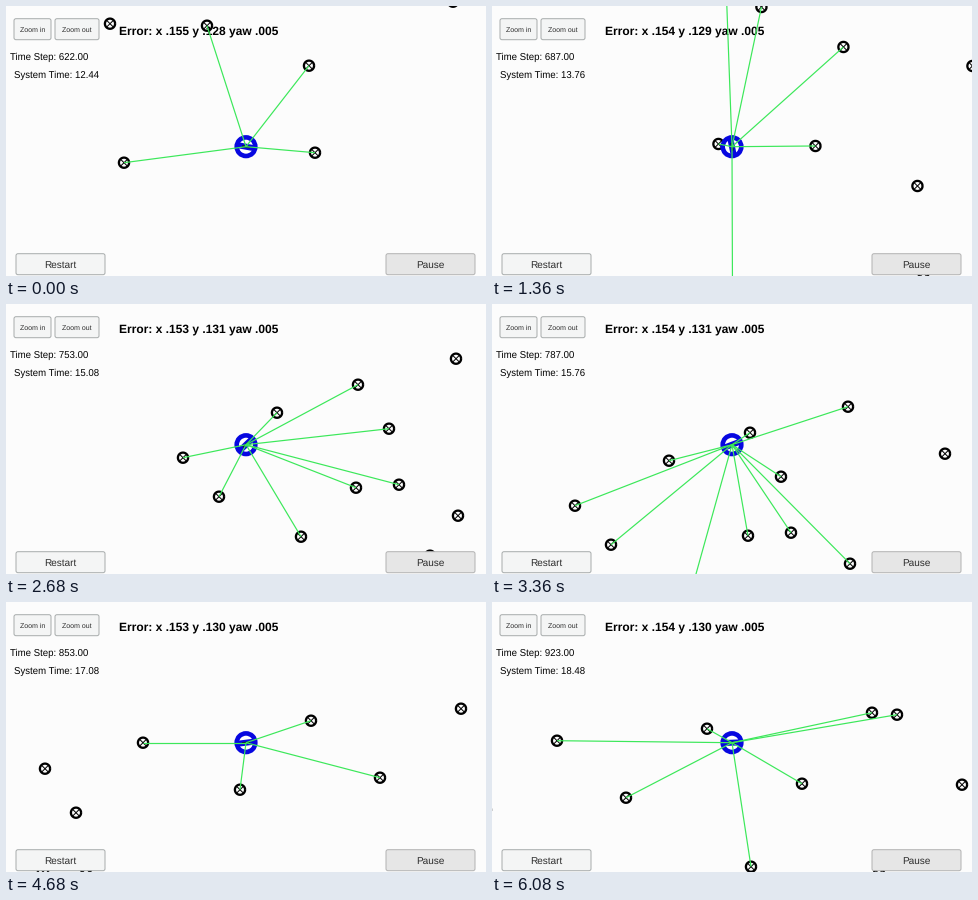
A matplotlib script for the animation above (6120 ms loop, 480 by 270 pixels).

```python
import numpy as np
import matplotlib.pyplot as plt
from matplotlib.animation import FuncAnimation
from matplotlib.collections import LineCollection
from matplotlib.patches import Circle, FancyBboxPatch

W, H, DPI = 480, 270, 100
PX = 72 / DPI                      # points per pixel
INTERVAL, FRAMES = 40, 153
SENSOR_RANGE = 179
ORIGIN = np.array([240, 141])
BLUE = "#0707e0"

plt.rcParams["font.family"] = "Liberation Sans"
plt.rcParams["text.hinting"] = "none"

# Key points of the drive: tick, view offset x, view offset y
DRIVE = np.array([(0, 0, 0), (16, 79, 35), (49, 120, 218), (66, 66, 312),
                  (83, -28, 360), (116, -247, 398), (151, -487, 418)], float)
TICKS, OFFSETS = DRIVE[:, 0], DRIVE[:, 1:]
SPEEDS = np.gradient(OFFSETS, TICKS, axis=0, edge_order=2)

# Map of the world, in view coordinates at the start of the drive
LANDMARKS = np.array([
    (104, 18), (201, 20), (303, 60), (309, 147), (118, 157), (447, -4),
    (396, -32), (205, -203), (317, -187), (111, -158), (284, -128),
    (327, -131), (147, -119), (229, -79), (358, -60), (384, -257),
    (286, -231), (386, -100), (481, -210), (702, -291), (552, -279),
    (621, -222), (867, -307), (892, -305), (797, -236), (957, -235),
    (746, -153), (874, -146)], float)

ANGLES = np.linspace(0, 2 * np.pi, 33)
RING = 5.1 * np.column_stack([np.cos(ANGLES), np.sin(ANGLES)])
CROSS = 3.4 * np.array([[(-1, -1), (1, 1)], [(-1, 1), (1, -1)]])


def camera(t):
    """Smooth path through the key points (cubic Hermite)."""
    i = min(np.searchsorted(TICKS, t, "right"), len(TICKS) - 1) - 1
    span = TICKS[i + 1] - TICKS[i]
    u = (t - TICKS[i]) / span
    ease = u * u * (3 - 2 * u)
    return (OFFSETS[i] + ease * (OFFSETS[i + 1] - OFFSETS[i])
            + span * u * (1 - u) * ((1 - u) * SPEEDS[i] - u * SPEEDS[i + 1]))


def pose_error(t):
    """Filter error in thousandths: an early bump that settles."""
    x = (153.5 + 2.2 * np.exp(-((t - 12) / 20) ** 2)
         + .3 * np.cos(2 * np.pi * (t - 83) / 64))
    y = 130 - 2 * np.cos(np.pi * t / 90) * np.exp(-(t / 90) ** 2)
    return round(x), round(y)


fig = plt.figure(figsize=(W / DPI, H / DPI), dpi=DPI, facecolor="#fcfcfc")
ax = fig.add_axes([0, 0, 1, 1])
ax.set_xlim(0, W)
ax.set_ylim(H + .3, .3)
ax.axis("off")


def label(x, y, size=9.6, text="", **kw):
    kw = {"color": "black", **kw}
    return ax.text(x, y, text, fontsize=size * PX, va="baseline", **kw)


def button(x, y, w, h, text, size, fill="#f4f5f5", edge="#a9adad"):
    ax.add_patch(FancyBboxPatch(
        (x + 2, y + 2), w - 4, h - 4, boxstyle="round,pad=2,rounding_size=2",
        fc=fill, ec=edge, lw=PX, zorder=6))
    label(x + w / 2, y + h / 2 + size * .34, size, text,
          ha="center", color="#2c2c2c", zorder=7)


def strokes(color, width, z):
    lines = LineCollection([], colors=color, linewidths=width * PX, zorder=z)
    return ax.add_collection(lines, autolim=False)


def bar(color, width):
    return ax.plot([], [], color=color, lw=width * PX,
                   solid_capstyle="butt", zorder=4)[0]


button(8, 13, 37, 21, "Zoom in", 7)
button(49, 13, 44, 21, "Zoom out", 7)
button(10, 248, 89, 21, "Restart", 10)
button(380, 248, 89, 21, "Pause", 10, "#e6e6e6", "#b4b4b4")

error = label(113, 28.8, 12, weight="bold", zorder=1)
step_text = label(4, 54.5)
time_text = label(8.5, 72.5)

rings = strokes("black", 2.3, 2)
crosses = strokes("black", 1, 2)
rays = strokes("#3ce85a", 1.2, 5)

ax.add_patch(Circle(ORIGIN, 9.3, fc="white", ec=BLUE, lw=4.6 * PX, zorder=3))
body = bar(BLUE, 6)
axle = bar("#10202c", 2)


def update(n):
    t = max(0, n - 1)              # the first pose holds for two ticks
    pos = LANDMARKS + camera(t)
    rings.set_segments([RING + p for p in pos])
    crosses.set_segments([c + p for p in pos for c in CROSS])
    near = np.hypot(*(pos - ORIGIN).T) < SENSOR_RANGE
    rays.set_segments([(ORIGIN, p) for p in pos[near]])

    heading = camera(max(t - .5, 0)) - camera(min(t + .5, TICKS[-1]))
    heading /= np.hypot(*heading)
    for line, reach in (body, 8), (axle, 4):
        line.set_data(*np.transpose([ORIGIN - reach * heading,
                                     ORIGIN + reach * heading]))

    clock = 622 + 2 * t
    step = clock - (t > 30)        # the step counter slips once
    error.set_text("Error: x .{} y .{} yaw .005".format(*pose_error(t)))
    step_text.set_text(f"Time Step: {step}.00")
    time_text.set_text(f"System Time: {clock * .02:.2f}")
    return []


anim = FuncAnimation(fig, update, frames=FRAMES, interval=INTERVAL,
                     repeat=True, repeat_delay=0, blit=False)
plt.show()
```
